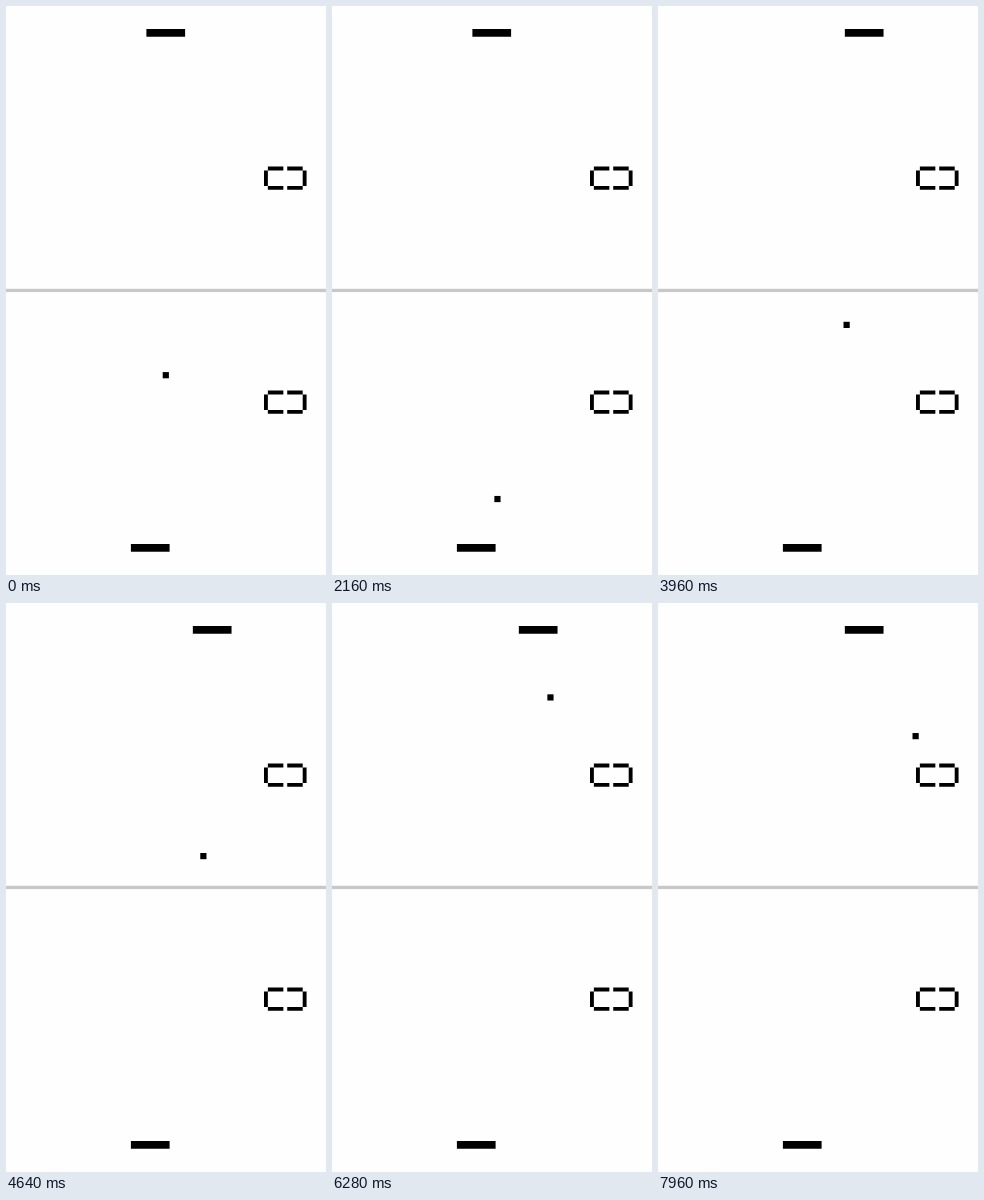
An HTML page for the animation above (8 s loop, 320 by 569 pixels).

```html
<!DOCTYPE html>
<html lang="en">
<head>
<meta charset="utf-8">
<title>Paddle game</title>
<style>
  html, body { margin: 0; width: 100%; height: 100%; overflow: hidden; background: #fefefe; }
  svg { display: block; width: 100%; height: 100%; }
</style>
</head>
<body>
<svg viewBox="0 0 320 569" preserveAspectRatio="none">
  <defs>
    <!-- sideways seven-segment zero on an 11 x 6 cell grid -->
    <path id="zero" transform="scale(3.87)"
      d="M0 1h1v4h-1z M1 0h4v1h-4z M6 0h4v1h-4z M1 5h4v1h-4z M6 5h4v1h-4z M10 1h1v4h-1z"/>
  </defs>
  <rect y="282.8" width="320" height="3.3" fill="#c8c8c8"/>
  <use href="#zero" x="258" y="160.6"/>
  <use href="#zero" x="258" y="384.6"/>
  <rect id="top" x="140.4" y="23" width="38.7" height="7.74"/>
  <rect x="124.9" y="538" width="38.7" height="7.74"/>
  <rect id="ball" width="6.2" height="6.2"/>
</svg>
<script>
  const TICK = 40, TICKS = 200;
  const SPEED = 3.87, PADDLE_STEP = 7.74;
  const PADDLE_START = 82, PADDLE_STEPS = 6;

  // Ball positions at serve, both bounces and the end of the loop.
  const path = [
    { tick: 0, x: 156.7, y: 366.1 },
    { tick: 43, x: 156.7, y: 366.1 + 43 * SPEED },
    { tick: 173, x: 223.6, y: 366.1 - 87 * SPEED },
    { tick: 200, x: 255.7, y: 366.1 - 60 * SPEED }
  ];

  const ball = document.getElementById('ball');
  const topPaddle = document.getElementById('top');
  const start = performance.now();

  function ballAt(tick) {
    const i = path.findIndex(p => p.tick > tick);
    const a = path[i - 1], b = path[i];
    const k = (tick - a.tick) / (b.tick - a.tick);
    return { x: a.x + (b.x - a.x) * k, y: a.y + (b.y - a.y) * k };
  }

  function draw(now) {
    const tick = Math.floor(Math.max(0, now - start) / TICK) % TICKS;
    const { x, y } = ballAt(tick);
    ball.setAttribute('x', x);
    ball.setAttribute('y', y);
    const moved = Math.min(PADDLE_STEPS, Math.max(0, tick - PADDLE_START));
    topPaddle.setAttribute('x', 140.4 + moved * PADDLE_STEP);
    requestAnimationFrame(draw);
  }
  draw(start);
</script>
</body>
</html>
```
